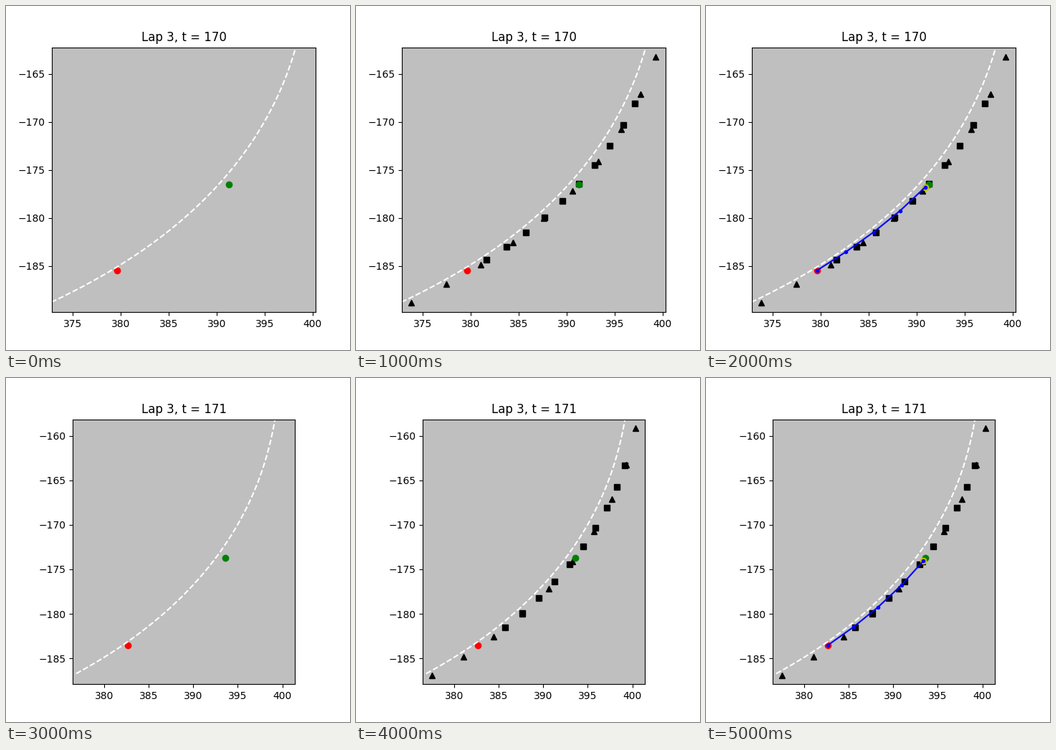
A matplotlib script for the animation above (6 s loop, 480 by 480 pixels).

```python
import numpy as np
import matplotlib.pyplot as plt
from matplotlib.animation import FuncAnimation
from matplotlib.ticker import MultipleLocator

STEPS = 2    # time steps per loop
STAGES = 3   # cars, then boundary points, then planned path


def smooth(t, x, y, deg):
    """Polynomial curve in t through a few key points."""
    mid = np.mean(t)
    fx, fy = (np.polyfit(np.subtract(t, mid), v, deg) for v in (x, y))

    def at(u):
        u = np.asarray(u) - mid
        return np.polyval(fx, u), np.polyval(fy, u)
    return at


# The centre line runs along y, the others along the index of a point
ys = [-188.73, -186.72, -185, -181.35, -176.75, -169.95, -162.24, -158.2]
center_at = smooth(ys, [372.9, 376.8, 379.85, 385, 390, 395, 398.25, 399.17],
                   ys, 5)
outer_at = smooth([0, 2, 5, 8, 10],
                  [373.82, 381.02, 390.58, 397.71, 400.37],
                  [-188.80, -184.85, -177.21, -167.12, -159.15], 4)
inner_at = smooth([0, 4, 8, 11],
                  [381.65, 389.53, 395.88, 399.18],
                  [-184.39, -178.22, -170.32, -163.34], 3)
plan_at = smooth([0, 2, 4, 5],
                 [379.63, 385.53, 390.91, 393.38],
                 [-185.47, -181.48, -176.79, -174.05], 3)


def moving(start, shift):
    """Position that advances by a fixed shift each time step."""
    return lambda step: np.add(start, np.multiply(shift, step))


xlim_at = moving((372.87, 400.35), (3.61, 1.09))
ylim_at = moving((-189.82, -162.22), (1.92, 4.07))
goal_at = moving((391.27, -176.48), (2.34, 2.75))
start_at = moving(-188.78, 2.06)

fig = plt.figure(figsize=(4.8, 4.8), dpi=100)
ax = fig.add_axes([0.13, 0.11, 0.775, 0.77], facecolor="#bfbfbf")
ax.set_aspect("equal", adjustable="box")
for axis in (ax.xaxis, ax.yaxis):
    axis.set_major_locator(MultipleLocator(5))

# Drawn from back to front
car, center, outer, inner, goal, end, plan = (
    ax.plot([], [], fmt)[0]
    for fmt in ("ro", "w--", "k^", "ks", "go", "yo", "b.-"))


def draw(i):
    step, stage = divmod(i, STAGES)
    bottom, top = ylim_at(step)
    ax.set_xlim(*xlim_at(step))
    ax.set_ylim(bottom, top)
    ax.set_title(f"Lap 3, t = {170 + step}")

    center.set_data(*center_at(np.linspace(start_at(step), top + 0.3, 150)))
    outer.set_data(*outer_at(step + np.arange(10)))
    inner.set_data(*inner_at(2 * step + np.arange(10)))
    plan.set_data(*plan_at(step + np.arange(5)))
    car.set_data(*plan_at([step]))
    end.set_data(*plan_at([step + 4]))
    x, y = goal_at(step)
    goal.set_data([x], [y])

    for line in (outer, inner):
        line.set_visible(stage >= 1)
    for line in (plan, end):
        line.set_visible(stage == 2)
    return car, center, outer, inner, goal, end, plan


anim = FuncAnimation(fig, draw, frames=STEPS * STAGES, interval=1000,
                     repeat=True, repeat_delay=0, blit=False)
plt.show()
```
